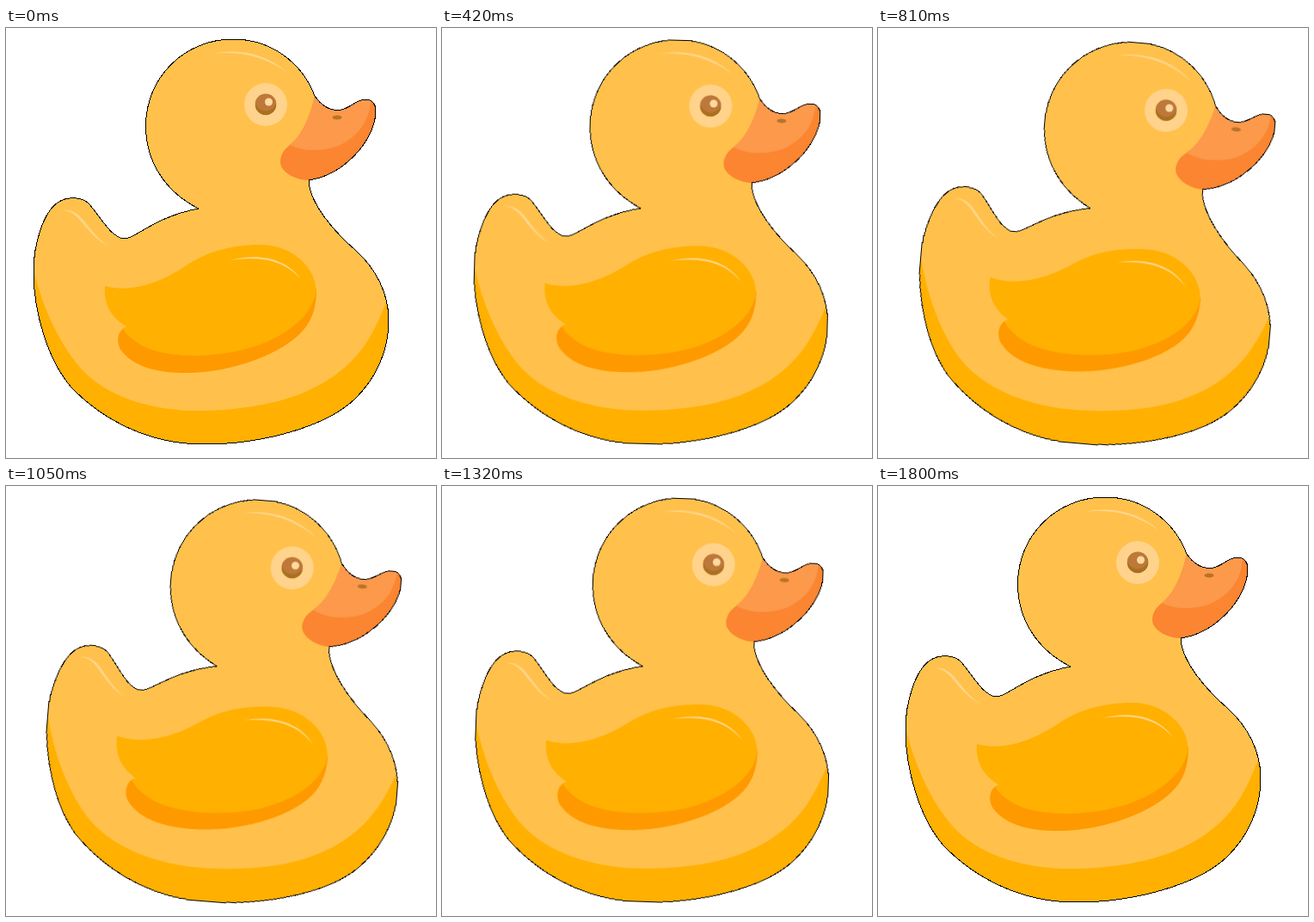
Write an HTML page that moves like this. It is 500 px wide and 500 px high and loops after 1.86 s.

```html
<!DOCTYPE html>
<html lang="en">
<head>
<meta charset="utf-8">
<title>Rocking rubber duck</title>
<style>
  html, body { margin: 0; width: 100%; height: 100%; overflow: hidden; background: #fff; }
  svg { display: block; width: 100vw; height: 100vh; }
  #duck { transform-origin: 240px 474px; }
  .shine { fill: #ffd58a; }
  .edge { fill: none; stroke: #000; stroke-width: 1; shape-rendering: crispEdges; }
</style>
</head>
<body>
<svg viewBox="0 0 500 500">
  <defs>
    <path id="outline" d="M224 210 C186 191 162.500 156 162.500 114 C162.500 57 208 13 264 13
      C308 13 344 40 359 79 C368 92 378 97 390 95 C402 92 408 83 418 83 C426 83 430 89 430 96
      C430 130 393 171 352 177 C353 205 383 238 407 259 C430 280 445 308 445 340
      C445 376 430 408 405 432 C372 463 300 484 230 484 C165 484 112 455 76 418
      C48 385 32 330 32 283 C32 252 43 215 60 203 C70 196 86 196 95 203
      C109 217 121 244 138 245 C150 245 174 219 224 210 Z"/>
    <clipPath id="body"><use href="#outline"/></clipPath>
    <clipPath id="iris"><circle cx="302" cy="89" r="12.500"/></clipPath>
  </defs>
  <g id="duck">
    <g clip-path="url(#body)">
      <use href="#outline" fill="#ffc14b"/>
      <path fill="#ffb000" d="M30 272 C40 320 62 370 92 401 C124 432 175 446 230 445
        C310 443 366 424 403 386 C422 367 434 341 446 308 V500 H30 Z"/>
      <!-- beak -->
      <path fill="#fb8530" d="M359 79 C354 101 345 124 330 136 C321 143 317 152 320 161
        C325 171 340 177 352 177 L440 180 V70 H359 Z"/>
      <path fill="#fc994b" d="M359 79 C354 101 345 124 330 136 C347 145 380 145 400 129
        C417 117 424 100 424 80 L400 70 Z"/>
    </g>
    <ellipse cx="385" cy="104" rx="5.500" ry="2.500" fill="#b87428"/>
    <!-- wing -->
    <path fill="#ff9900" d="M139 348 C129 352 128 366 134 375 C150 396 180 401 210 401
      C262 401 322 379 346 351 C359 336 361 318 361 303 L300 300 Z"/>
    <path fill="#ffb000" d="M115 300 C145 308 178 297 207 278 C235 258 268 252 296 252
      C332 252 360 278 360.500 305 C359 326 338 350 305 364 C265 383 200 386 166 373
      C152 367 141 358 136 350 L140 347 C124 338 113 322 115 300 Z"/>
    <!-- highlights -->
    <path class="shine" d="M260 270 C295 261 326 268 343 292 C323 270 297 265 260 270 Z"/>
    <path class="shine" d="M240 30 C273 23 305 31 327 52 C304 35 274 26 240 30 Z"/>
    <path class="shine" d="M65 212 C90 209 92 236 120 254 C90 239 87 212 65 212 Z"/>
    <!-- eye -->
    <circle cx="302" cy="89" r="25" fill="#ffd38b"/>
    <g clip-path="url(#iris)">
      <circle cx="302" cy="89" r="12.500" fill="#a8701f"/>
      <circle cx="302" cy="84" r="12.500" fill="#bd783a"/>
    </g>
    <circle cx="305.500" cy="86" r="4.500" fill="#ffd9a0"/>
    <use class="edge" href="#outline"/>
  </g>
</svg>
<script>
  const STEP = 30, SWING = 900, LOOP = 1860;

  const rock = document.getElementById('duck').animate(
    [{ transform: 'rotate(0deg)' }, { transform: 'rotate(5.15deg)' }],
    { duration: SWING, iterations: 2, direction: 'alternate', fill: 'both',
      easing: 'cubic-bezier(.55, 0, .7, 1)' }
  );
  rock.pause();

  // Advance in fixed steps and hold the rest pose at the end of each loop.
  function draw() {
    const t = performance.now() % LOOP;
    rock.currentTime = Math.min(Math.floor(t / STEP) * STEP, 2 * SWING);
    requestAnimationFrame(draw);
  }
  draw();
</script>
</body>
</html>
```
